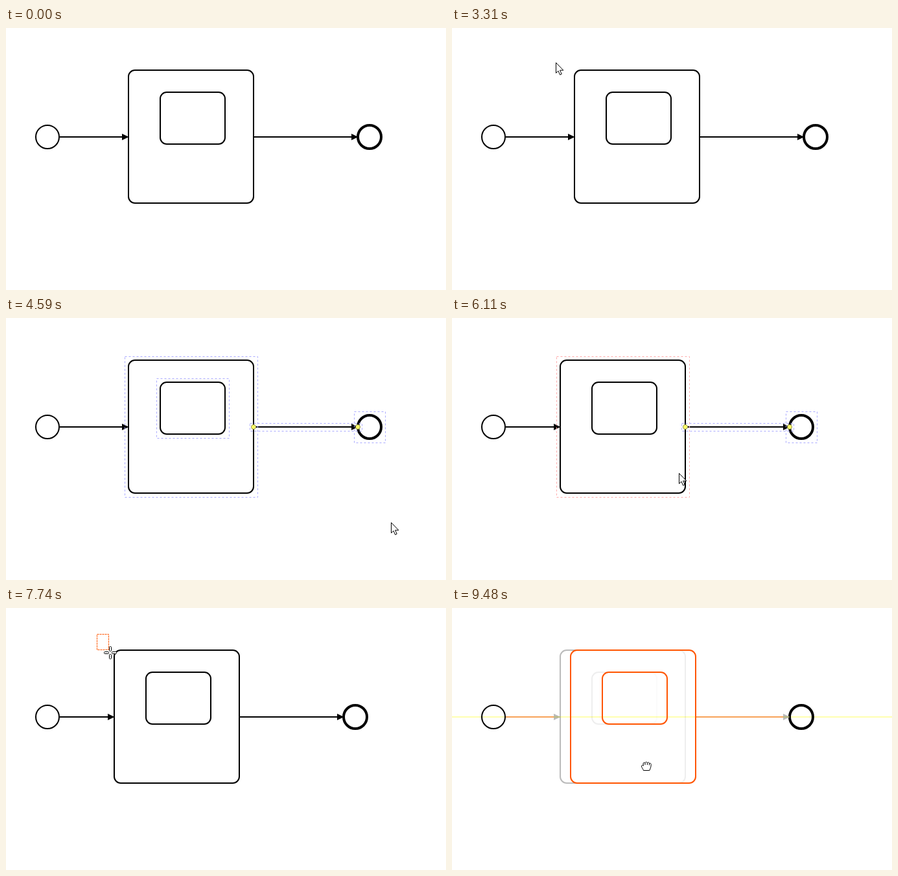
Recreate the animation shown at these times as an HTML page with a canvas. Size 679x404 px, loop 9700 ms.

```html
<!DOCTYPE html>
<html lang="en">
<head>
<meta charset="utf-8">
<title>Diagram editor</title>
<style>
  html, body { margin: 0; width: 100%; height: 100%; overflow: hidden; background: #fff; }
  canvas { display: block; }
</style>
</head>
<body>
<canvas id="stage" width="679" height="404"></canvas>
<script>
const ctx = document.getElementById('stage').getContext('2d');
const LOOP = 9700, TICK = 40;
const BLACK = '#000', ORANGE = '#ff5500', BLUE = '#aaaaff', RED = '#ffaaaa';

const smooth = p => p * p * (3 - 2 * p);
const linear = p => p;
const easeIn = p => p * p;
const easeOut = p => 1 - (1 - p) * (1 - p);

// Pointer legs: start, end, x, y, easing
const legs = [
  [740, 740, 460, 367],
  [1840, 2590, 162, 55],
  [3310, 3310, 160, 53],
  [3350, 3350, 159, 52],
  [3540, 4350, 604, 325],
  [4550, 4550, 602, 318],
  [4590, 4590, 594, 315],
  [4630, 4790, 372, 239, easeOut],
  [5020, 5180, 350, 239],
  [6240, 6800, 120, 36],
  [6840, 6840, 120, 35],
  [6880, 6880, 119, 35],
  [7380, 7580, 140, 40, easeIn],
  [7620, 7700, 158, 64, easeOut],
  [7740, 7740, 161, 69],
  [7780, 8340, 389, 316],
  [8380, 8460, 394, 316, easeOut],
  [8500, 8500, 386, 308],
  [8540, 9020, 284, 244],
  [9060, 9300, 296, 244, linear],
  [9360, 9480, 300, 244, linear]
];

function pointerAt(t) {
  let x = 460, y = 367;
  for (const [start, end, toX, toY, ease = smooth] of legs) {
    if (t < start) break;
    const steps = Math.round((end - start) / TICK) + 1;
    const p = ease(Math.min(1, (Math.floor((t - start) / TICK) + 1) / steps));
    x += (toX - x) * p;
    y += (toY - y) * p;
  }
  return { x: Math.round(x), y: Math.round(y) };
}

const between = (t, a, b) => t >= a && t < b;
const inside = (p, b) => p.x >= b.x && p.x <= b.x + b.w && p.y >= b.y && p.y <= b.y + b.h;

function layout(shift) {
  return {
    sub: { x: 189 + shift, y: 65, w: 193, h: 205 },
    task: { x: 238 + shift, y: 99, w: 100, h: 80 },
    flow: { x: 382 + shift, y: 168, w: 161, h: 0 },
    end: { x: 543 + shift, y: 150, w: 36, h: 36 }
  };
}

function paint(fill, stroke, width) {
  ctx.lineWidth = width;
  ctx.fillStyle = fill;
  ctx.strokeStyle = stroke;
  ctx.fill();
  ctx.stroke();
}

function box(b, dx = 0, stroke = BLACK, fill = '#fff') {
  ctx.beginPath();
  ctx.roundRect(b.x + dx, b.y, b.w, b.h, 10);
  paint(fill, stroke, 2);
}

function circle(x, y, r, width, stroke = BLACK, fill = '#fff') {
  ctx.beginPath();
  ctx.arc(x, y, r, 0, Math.PI * 2);
  paint(fill, stroke, width);
}

function line(x1, x2, color) {
  ctx.fillStyle = color;
  ctx.fillRect(x1, 167, x2 - x1, 2);
}

function arrowHead(x, color) {
  ctx.fillStyle = color;
  ctx.beginPath();
  ctx.moveTo(x - 10, 163);
  ctx.lineTo(x + .5, 168);
  ctx.lineTo(x - 10, 173);
  ctx.fill();
}

function dashed(x, y, w, h, color, dash) {
  ctx.lineWidth = 1;
  ctx.strokeStyle = color;
  ctx.setLineDash(dash);
  ctx.strokeRect(x + .5, y + .5, w, h);
  ctx.setLineDash([]);
}

const outline = (b, color) => dashed(b.x - 6, b.y - 6, b.w + 12, b.h + 12, color, [3, 3]);

function drawStill({ sub, task, flow, end }) {
  line(82, sub.x - 2, BLACK);
  circle(64, 168, 18, 2);
  box(sub);
  box(task);
  arrowHead(sub.x, BLACK);
  circle(end.x + 18, 168, 18, 4);
  line(flow.x, end.x - 2, BLACK);
  arrowHead(end.x, BLACK);
}

function drawDrag({ sub, task, flow, end }, dx, withEnd) {
  const ghost = '#bbb', veil = 'rgba(255,255,255,.75)', link = '#f7a258';
  circle(64, 168, 18, 2);
  box(sub, 0, ghost);
  box(task, 0, ghost);
  circle(end.x + 18, 168, 18, 4, withEnd ? ghost : BLACK);
  arrowHead(sub.x, ghost);
  arrowHead(end.x, ghost);
  box(sub, dx, ORANGE, veil);
  box(task, dx, ORANGE, veil);
  if (withEnd) circle(end.x + 18 + dx, 168, 18, 4, ORANGE, veil);

  ctx.globalCompositeOperation = 'multiply';
  line(0, 679, '#ffffb0');
  ctx.globalCompositeOperation = 'source-over';

  const linkEnd = end.x + (withEnd ? dx : 0);
  line(83, Math.min(sub.x - 10, sub.x + dx), link);
  line(flow.x + dx + 1, linkEnd - (withEnd ? 2 : 10), link);
}

function drawSelection(parts, names, hover) {
  for (const name of names) if (name !== hover) outline(parts[name], BLUE);
  if (hover) outline(parts[hover], RED);
  if (names.includes('flow')) {
    for (const x of [parts.flow.x, parts.end.x]) circle(x, 168, 3.5, 1, '#8f8f50', '#ffff66');
  }
}

const arrowPath = new Path2D('M.5 .5V16.5L4 13.2L6.6 19.2L9.2 18L6.6 12.2H11.8Z');
const handPath = new Path2D(
  'M-4.5 6.5C-5.5 3.5 -7.5 2 -7.5 0C-7.5 -1.6 -6 -2 -4.6 -.8' +
  'L-5 -4C-4.8 -6 -2.6 -6.2 -2 -4.6C-1.8 -7.2 1 -7.2 1.4 -4.8' +
  'C2 -6.6 4.4 -6.2 4.4 -4.2C5.4 -5.2 7.4 -4.4 7.2 -2.6' +
  'C7.2 1 6.4 2.5 4.8 6.5ZM-2 -4.6V-2M1.4 -4.8V-2M4.4 -4.2V-1.6');

function drawPointer({ x, y }, kind) {
  ctx.save();
  ctx.translate(x, y);
  ctx.lineWidth = 1;
  ctx.fillStyle = '#fff';
  ctx.strokeStyle = BLACK;
  if (kind === 'cross') {
    for (let i = 0; i < 4; i++) {
      ctx.beginPath();
      ctx.roundRect(-1.5, -9.5, 3, 7, 1);
      ctx.fill();
      ctx.stroke();
      ctx.rotate(Math.PI / 2);
    }
  } else {
    const path = kind === 'hand' ? handPath : arrowPath;
    ctx.lineJoin = kind === 'hand' ? 'round' : 'miter';
    ctx.fill(path);
    ctx.stroke(path);
  }
  ctx.restore();
}

function selectedAt(t) {
  if (between(t, 4550, 5830)) return ['sub', 'task', 'flow', 'end'];
  if (between(t, 5830, 7180)) return ['sub', 'flow', 'end'];
  if (t >= 8500) return ['sub', 'task'];
  return [];
}

function render(t) {
  const pointer = pointerAt(t);
  const parts = layout(t < 5830 ? 0 : -22);
  const firstDrag = between(t, 5020, 5830);
  const dragging = firstDrag || t >= 9060;
  const firstLasso = between(t, 3620, 4550);
  const lasso = firstLasso || between(t, 7620, 8500);

  ctx.fillStyle = '#fff';
  ctx.fillRect(0, 0, 679, 404);

  if (dragging) {
    drawDrag(parts, pointer.x - (firstDrag ? 372 : 284), firstDrag);
  } else {
    drawStill(parts);
    const hover = lasso ? null : ['task', 'sub', 'end'].find(n => inside(pointer, parts[n]));
    drawSelection(parts, selectedAt(t), hover);
  }
  if (lasso) {
    const [x, y] = firstLasso ? [159, 53] : [140, 40];
    const corner = pointerAt(t - TICK);
    dashed(x, y, Math.max(1, corner.x - x), Math.max(1, corner.y - y), ORANGE, [3, 1]);
  }
  if (t >= 740) drawPointer(pointer, dragging ? 'hand' : lasso ? 'cross' : 'arrow');
}

const began = performance.now();
function tick() {
  render((performance.now() - began) % LOOP);
  requestAnimationFrame(tick);
}
tick();
</script>
</body>
</html>
```
